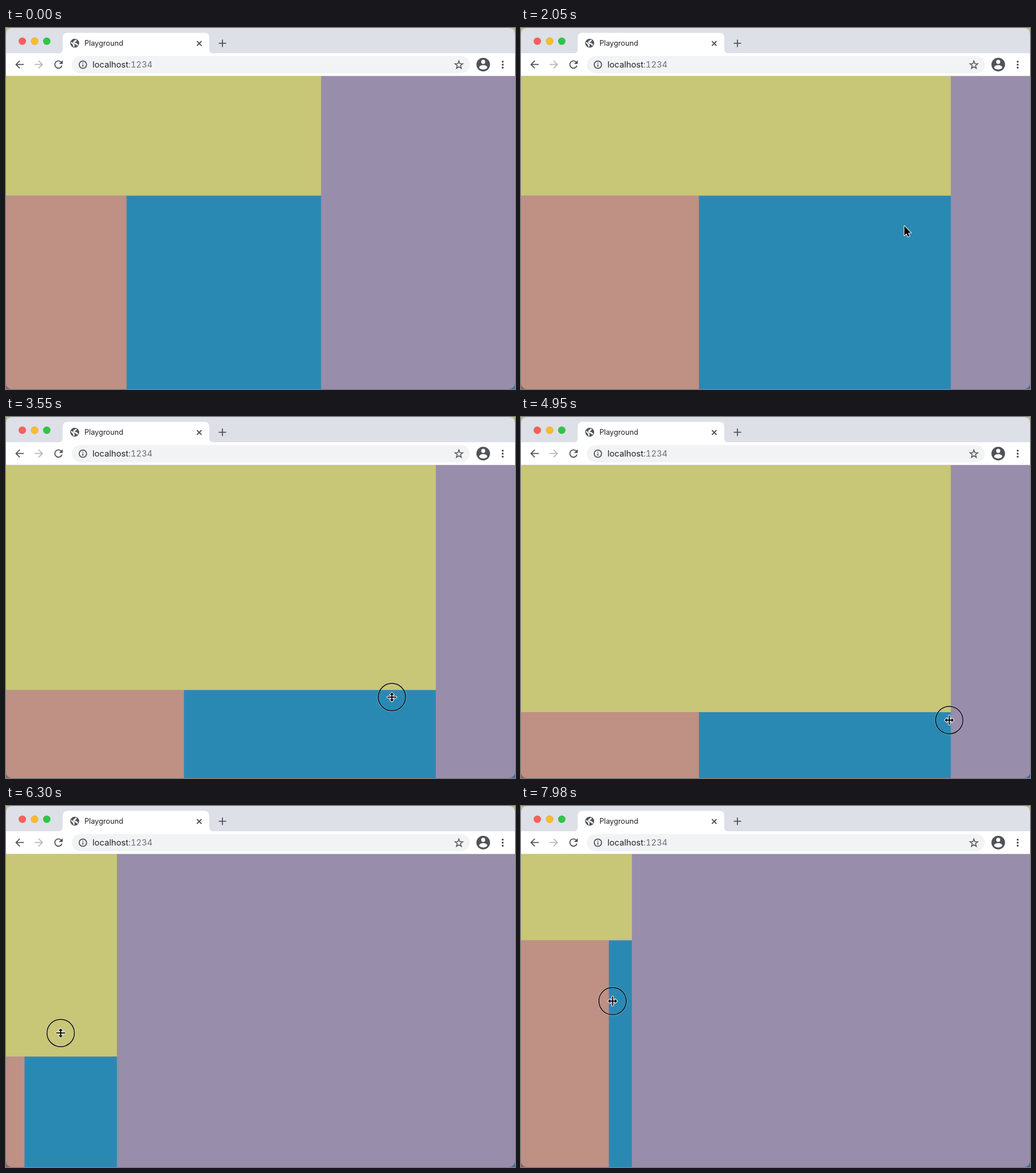
Recreate the animation shown at these times as an HTML page. Size 889 px wide and 630 px high, loop 8 s.

```html
<!DOCTYPE html>
<html lang="en">
<head>
<meta charset="utf-8">
<title>Playground</title>
<style>
  html, body { margin: 0; width: 100%; height: 100%; overflow: hidden; background: #c5c47a; }
  svg { display: block; width: 100%; height: 100%; }
  text { font-family: Inter, Roboto, "Liberation Sans", sans-serif; font-variant-numeric: tabular-nums; fill: #202124; }
  .solid { fill: #4f5358; }
  .line { fill: none; stroke: #4f5358; stroke-width: 1.8; }
  .lights { stroke: #000; stroke-opacity: .1; }
  .pointer { stroke: #fff; stroke-width: 2; stroke-linejoin: round; paint-order: stroke; }
</style>
</head>
<body>
<svg viewBox="0 0 889 630" preserveAspectRatio="none">
  <defs>
    <clipPath id="window"><rect width="889" height="630" rx="10"/></clipPath>
  </defs>
  <!-- desktop showing behind the rounded corners -->
  <rect width="889" height="630" fill="#c5c47a"/>
  <rect y="600" width="444" height="30" fill="#8d6258"/>
  <rect x="444" y="600" width="445" height="30" fill="#3a6f97"/>

  <g clip-path="url(#window)">
    <rect width="889" height="630" fill="#998dac"/>
    <rect id="top" y="84" fill="#c8c677"/>
    <rect id="left" fill="#bf9084"/>
    <rect id="mid" fill="#2a89b3"/>

    <!-- tab strip -->
    <rect width="889" height="45" fill="#dde0e7"/>
    <rect y="44" width="889" height="40" fill="#fff"/>
    <rect y="83" width="889" height="1" fill="#dfe0e2"/>
    <path d="M91 44.5Q99 44.5 99 36.5V17Q99 8.5 107.5 8.5H346.5Q355 8.5 355 17V36.5Q355 44.5 363 44.5Z" fill="#fff"/>
    <g class="lights">
      <circle cx="28.5" cy="23" r="6.3" fill="#fc5f57"/>
      <circle cx="50" cy="23" r="6.3" fill="#fcbb2f"/>
      <circle cx="71.2" cy="23" r="6.3" fill="#2fc646"/>
    </g>
    <g transform="translate(120 26.5)">
      <circle r="7.8" class="solid"/>
      <path d="M-6 -1.500L-1.500 3V6.200M2.500 -6Q2 -3 -1 -2.800Q-2.500 0 1 .5Q4 1 5 4" fill="none" stroke="#fff" stroke-width="2.400"/>
    </g>
    <text x="137" y="31" font-size="12.7">Playground</text>
    <path d="M333.500 23l8 8m0-8l-8 8M371.500 26.700h13m-6.500-6.500v13" class="line"/>

    <!-- toolbar -->
    <rect x="115" y="49" width="695" height="30" rx="15" fill="#f1f3f4"/>
    <text x="151" y="69" font-size="14.7">localhost<tspan fill="#6b7075">:1234</tspan></text>
    <path id="back" d="M31 63.700H17.500m6.600-6.600l-6.600 6.600l6.600 6.600" class="line"/>
    <use href="#back" transform="translate(81 0) scale(-1 1)" opacity=".42"/>
    <path d="M96.500 59.500A6.400 6.400 0 1 0 97.800 65.500" class="line"/>
    <path d="M99 56.300v6.500h-6.500z" class="solid"/>
    <g transform="translate(134.3 64)">
      <circle r="6.400" class="line" stroke-width="1.400"/>
      <path d="M0 -3.500v1.600M0 -.6v4.200" class="line"/>
    </g>
    <path id="star" transform="translate(791 64.600)" class="line" style="stroke-width:1.500"/>
    <g transform="translate(833.500 63.800)">
      <circle r="11.900" class="solid"/>
      <circle cy="-4.700" r="3.600" fill="#fff"/>
      <ellipse cy="4.800" rx="7.100" ry="3.800" fill="#fff"/>
    </g>
    <path d="M867.500 58.700v10.700" class="line" style="stroke-width:3.600;stroke-linecap:round;stroke-dasharray:0 5.300"/>

    <g id="cursor">
      <g id="ring" fill="none">
        <circle r="25" stroke="#fff" stroke-opacity=".55"/>
        <circle r="24" stroke="#0b0b10" stroke-width="1.500"/>
      </g>
      <path id="arrow" class="pointer" d="M0 0V16.500L3.800 13L6.300 18.800L8.900 17.700L6.500 12H11.500Z"/>
      <path id="resize" class="pointer" d="M-8 0L-4 -3.800V-1H-.9V-8H.9V-1H4V-3.800L8 0L4 3.800V1H.9V8H-.9V1H-4V3.800Z"/>
    </g>
  </g>
</svg>
<script>
const LOOP = 8000;
const LAG = 30; // dividers trail the pointer by this many ms
const $ = id => document.getElementById(id);
const set = (el, attrs) => {
  for (const k in attrs) el.setAttribute(k, attrs[k]);
};
const show = (id, on) => set($(id), { visibility: on ? "visible" : "hidden" });

function starPath(outer, inner) {
  const points = Array.from({ length: 10 }, (_, i) => {
    const r = i % 2 ? inner : outer, a = i * Math.PI / 5;
    return `${r * Math.sin(a)} ${-r * Math.cos(a)}`;
  });
  return `M${points.join("L")}Z`;
}
set($("star"), { d: starPath(7.2, 3) });

// Pointer script: each action starts where the previous one ended
const move = (start, end, x, y) => ({ begin: start, start, end, x, y });
const drag = (split, begin, start, end, x, y) => ({ split, begin, start, end, x, y });
const home = { x: 470, y: 480 };
const actions = [
  move(250, 350, 544, 418),
  drag("outer", 700, 1150, 1736, 744.4, 418),
  move(1800, 2050, 669.5, 345.5),
  move(2050, 2450, 674, 287.8),
  drag("row", 2980, 3220, 3633, 674, 510.3),
  move(3800, 4100, 735, 566),
  move(4100, 4350, 748, 529),
  drag("outer", 4650, 4950, 5740, 191, 529),
  move(5750, 6040, 95.5, 510.7),
  drag("row", 6050, 6150, 6490, 95.5, 230),
  move(6600, 7300, 28, 331),
  drag("inner", 7500, 7780, 7990, 160.7, 340.6)
];

function progress(action, t) {
  const u = (t - action.start) / (action.end - action.start);
  return (1 - Math.cos(Math.PI * Math.min(1, Math.max(0, u)))) / 2;
}

// Pointer place and look, and divider places, at time t
function stateAt(t) {
  const split = { outer: 550.3, row: 292.7, inner: 0 };
  let { x, y } = home, from = home, current = null;
  for (const a of actions) {
    if (a.begin > t) break;
    const u = progress(a, t);
    x = from.x + (a.x - from.x) * u;
    y = from.y + (a.y - from.y) * u;
    if (a.split) {
      const distance = a.split === "row" ? a.y - from.y : a.x - from.x;
      split[a.split] += distance * progress(a, t - LAG);
    }
    from = current = a;
  }
  let grip = current && current.split;
  if (current && !grip && t >= current.end) {
    grip = actions.find(a => a.split && a.begin > t).split;
  }
  return { x, y, split, visible: current, pressed: current && current.split, grip };
}

function step(t) {
  const s = t % 1000;
  return t - s + (s >= 980 ? 980 : s - s % 50);
}

function draw(now) {
  const { x, y, split, visible, pressed, grip } = stateAt(step(now % LOOP));
  const { outer, row } = split;
  const inner = outer / 2 - 64.5 + split.inner; // both lower panes share a resize equally
  set($("top"), { width: outer, height: row - 84 });
  set($("left"), { y: row, width: inner, height: 630 - row });
  set($("mid"), { x: inner, y: row, width: outer - inner, height: 630 - row });

  set($("cursor"), { transform: `translate(${x} ${y})` });
  show("arrow", visible && !grip);
  show("resize", grip);
  show("ring", pressed);
  set($("resize"), { transform: `rotate(${grip === "row" ? 90 : 0})` });
}

let start;
function tick(now) {
  start ??= now;
  draw(now - start);
  requestAnimationFrame(tick);
}
draw(0);
requestAnimationFrame(tick);
</script>
</body>
</html>
```
